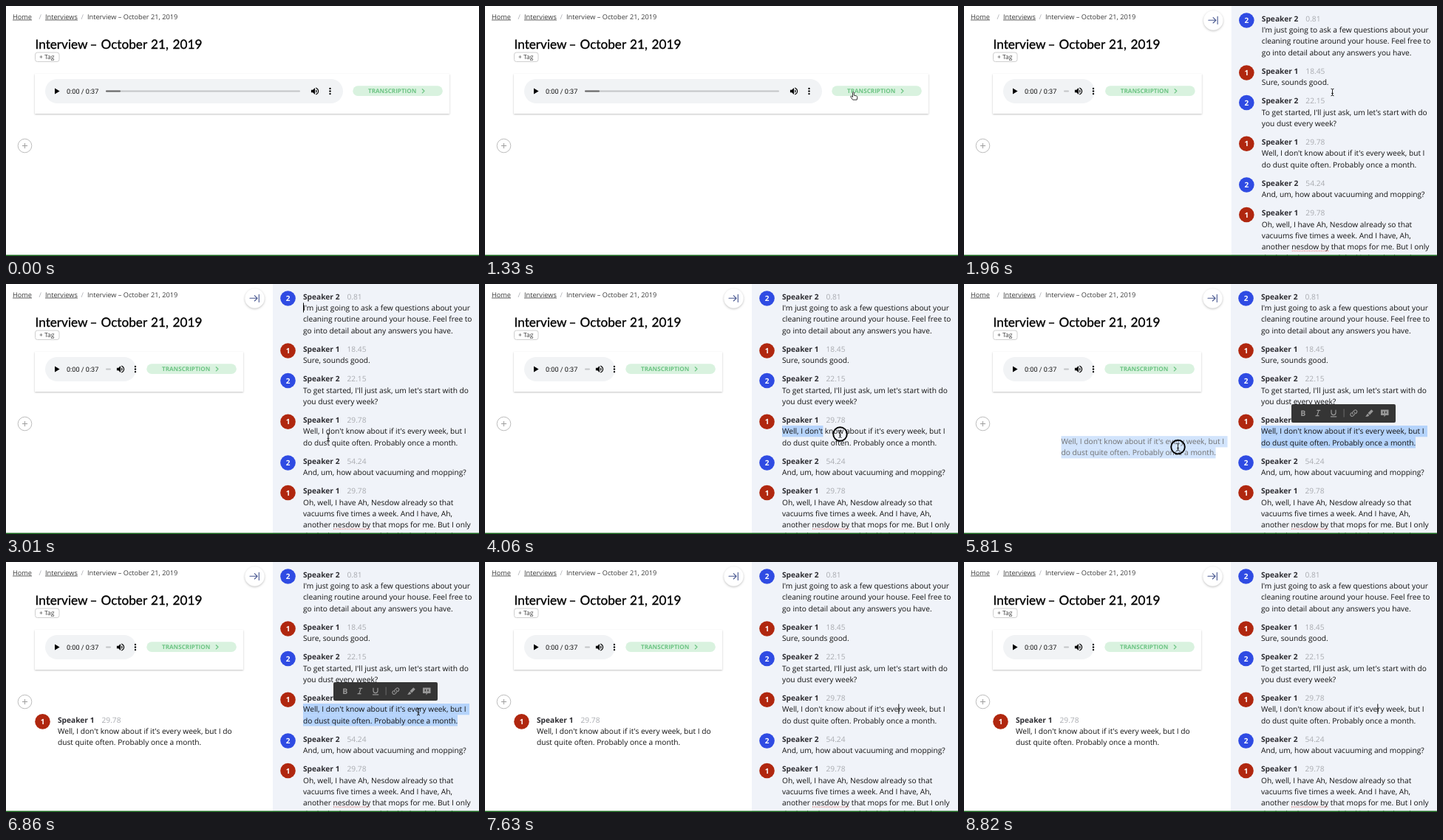
Write an HTML page that moves like this. It is 640 px wide and 339 px high and loops after 8890 ms.

```html
<!DOCTYPE html>
<html lang="en">
<head>
<meta charset="utf-8">
<title>Interview transcript</title>
<style>
  html, body { margin: 0; width: 100%; height: 100%; overflow: hidden; background: #fff; }
  svg { display: block; width: 100vw; height: 100vh; }
  text { font-family: "Open Sans", sans-serif; fill: #111; text-rendering: geometricPrecision; white-space: pre; }
  .title { font-family: Lato, sans-serif; fill: #000; stroke: #000; stroke-width: .35px; }
  .clock { font-family: Roboto, sans-serif; }
  .bold { font-weight: 700; }
  .name { font-weight: 700; fill: #2e2e33; }
  .grey { fill: #a9abb0; }
  .crumb { fill: #3c3c3c; }
  .line { fill: none; stroke-linecap: round; stroke-linejoin: round; }
  #card { fill: #fff; filter: drop-shadow(0 1px 1.2px rgba(0,0,0,.24)); }
  #fold circle { fill: #fff; filter: drop-shadow(0 1px 1.5px rgba(0,0,0,.25)); }
</style>
</head>
<body>
<svg id="stage" viewBox="0 0 640 339"></svg>
<script>
const LOOP = 8890, STEP = 70;
const BLUE = "#2f4be3", RED = "#b0270f";
const SIZE = 10.2, LEAD = 15.25, GAP = 40.5;

const text = (x, y, size, str, more = "") =>
  `<text x="${x}" y="${y}" font-size="${size}" ${more}>${str}</text>`;
const rect = (x, y, w, h, fill, more = "") =>
  `<rect x="${x}" y="${y}" width="${w}" height="${h}" fill="${fill}" ${more}/>`;
const stroke = (d, color, width = 1, more = "") =>
  `<path class="line" d="${d}" stroke="${color}" stroke-width="${width}" ${more}/>`;

const lines = (x, y, rows) =>
  rows.map((row, i) => text(x, y + i * LEAD, SIZE, row)).join("");

// One speaker turn; y is the baseline of the name.
const turn = (x, y, who, time, rows) =>
  `<circle cx="${x - 20.5}" cy="${y - 1.2}" r="10.3" fill="${who === 1 ? RED : BLUE}"/>` +
  text(x - 20.5, y + 2.4, 10, who, 'class="bold" style="fill:#fff" text-anchor="middle"') +
  text(x, y, SIZE, "Speaker " + who, 'class="name"') +
  text(x + 59.5, y, SIZE, time, 'class="grey"') +
  lines(x, y + 15.5, rows);

const quote = ["Well, I don't know about if it's every week, but I",
               "do dust quite often. Probably once a month."];
const copied = ["Well, I don't know about if it's every week, but I do",
                "dust quite often. Probably once a month."];
const talk = [
  [2, "0.81", ["I'm just going to ask a few questions about your",
               "cleaning routine around your house. Feel free to",
               "go into detail about any answers you have."]],
  [1, "18.45", ["Sure, sounds good."]],
  [2, "22.15", ["To get started, I'll just ask, um let's start with do",
                "you dust every week?"]],
  [1, "29.78", quote],
  [2, "54.24", ["And, um, how about vacuuming and mopping?"]],
  [1, "29.78", ["Oh, well, I have Ah, Nesdow already so that",
                "vacuums five times a week. And I have, Ah,",
                "another nesdow by that mops for me. But I only",
                "do the bathrooms and the kitchen by hand."]]
];

function transcript() {
  let y = 20.7, out = "";
  for (const [who, time, rows] of talk) {
    out += turn(402, y, who, time, rows);
    y += GAP + (rows.length - 1) * LEAD;
  }
  return out;
}

const titleWords = [[39.5, "Interview"], [113.5, "–"], [128.5, "October"], [196, "21,"], [225.5, "2019"]];

const page =
  text(9, 17.6, 9.2, "Home", 'class="crumb"') + rect(9, 18.6, 26, .8, "#3c3c3c") +
  text(44.4, 17.6, 9.2, "/", 'class="grey"') +
  text(53, 17.6, 9.2, "Interviews", 'class="crumb"') + rect(53, 18.6, 44, .8, "#3c3c3c") +
  text(101.6, 17.6, 9.2, "/", 'class="grey"') +
  text(110, 17.6, 9.2, "Interview – October 21, 2019", 'class="crumb"') +
  titleWords.map(([x, w]) => text(x, 58, 17.2, w, 'class="title"')).join("") +
  rect(39.5, 63, 32.5, 12.5, "#fff", 'rx="3" stroke="#cfcfcf"') +
  text(45, 72.2, 8.5, "+ Tag", 'class="crumb"') +
  '<circle cx="25.5" cy="189.5" r="9.3" fill="#fff" stroke="#bdbdbd"/>' +
  stroke("M22.3 189.5h6.4M25.5 186.3v6.4", "#a0a0a0");

const speaker = "M3 9v6h4l5 5V4L7 9H3zm13.5 3c0-1.77-1.02-3.29-2.5-4.03v8.05c1.48-.73 2.5-2.25 2.5-4.02z" +
  "M14 3.23v2.06c2.89.86 5 3.54 5 6.71s-2.11 5.85-5 6.71v2.06c4.01-.91 7-4.49 7-8.77s-2.99-7.86-7-8.77z";

const player =
  rect(39, 92, 561, 54, "#fff", 'id="card"') +
  rect(53, 99, 402, 33, "#f1f3f5", 'id="pill" rx="16.5"') +
  '<path d="M66 111.4l6.6 4.1-6.6 4.1z"/>' +
  text(82, 118.8, 9.1, "0:00 / 0:37", 'class="clock"') +
  rect(135, 114.5, 263, 2, "#c3c5c7", 'id="bar" rx="1"') +
  rect(135, 114.5, 20, 2, "#666", 'id="buffer" rx="1"') +
  `<g id="volume"><path transform="translate(-6.8 108.7) scale(.57)" d="${speaker}"/></g>` +
  '<g id="more">' + [111.9, 115.5, 119.1].map(y => `<circle cy="${y}" r="1.2"/>`).join("") + "</g>" +
  '<g id="button">' + rect(0, 108.3, 121.5, 13.8, "#d9f2df", 'rx="6.9"') +
  text(20.7, 118.3, 8.1, "TRANSCRIPTION", 'class="bold" style="fill:#6cc483"') +
  stroke("M94 112.7l2.7 2.6-2.7 2.6", "#6cc483", 1.2) + "</g>";

const fold = '<g id="fold"><circle cx="336.5" cy="19.5" r="13.2"/>' +
  stroke("M330 19.3h10M336.3 15.6l3.8 3.7-3.8 3.7M342.3 14.2v10.2", "#46568f", 1.1) + "</g>";

const panel = '<g id="panel">' + rect(361, 0, 279, 339, "#f0f3f9") +
  '<g id="select">' + rect(402, 192, 0, 15.3, "#b5d3fb", 'id="sel1"') +
  rect(402, 207.2, 0, 15.3, "#b5d3fb", 'id="sel2"') + "</g>" + transcript() +
  stroke("M443.5 332H493", "#e0423a", 1.1, 'stroke-dasharray=".1 2.2"') +
  rect(402, 25.5, 1, 13, "#111", 'id="caret1"') +
  rect(559.3, 192.5, 1, 13.5, "#111", 'id="caret2"') + "</g>";

const ICON = "#979797";
const toolbar = '<g id="toolbar">' + rect(443, 163, 141, 25, "#353535", 'rx="2"') +
  text(455.3, 178.7, 10.5, "B", `class="bold" style="fill:${ICON}"`) +
  stroke("M477.8 171.3h4M476 178.7h4M480 171.3l-2.2 7.4", ICON, 1.2) +
  stroke("M497 171v3.6a3 3 0 0 0 6 0V171M496.4 179.8h7.4", ICON, 1.2) +
  rect(513.6, 169.5, 1, 11, "#6d6d6d") +
  stroke("M526.2 176.4a2.2 2.2 0 0 1 0-3l2-2a2.2 2.2 0 0 1 3.1 3.1l-1 1" +
         "M528.4 173.8a2.2 2.2 0 0 1 0 3l-2 2a2.2 2.2 0 0 1-3.1-3.1l1-1", ICON, 1.1) +
  `<path fill="${ICON}" d="M551.2 170.2l2.5 2.4-4.6 5-2.6-2.6zM546 175.7l2.4 2.3-1.6 1.4-3.6.6 1.6-2.4z"/>` +
  `<path fill="${ICON}" d="M564 170.5h10.5v7.5h-4l-2 2.4v-2.4H564z"/>` +
  stroke("M567.4 173.2v1.6M571 173.2v1.6", "#353535", 1.4) + "</g>";

const ghost = '<g id="ghost" opacity=".6">' + rect(402, 192, 225, 15.3, "#b5d3fb") +
  rect(402, 207, 209, 15.3, "#b5d3fb") + lines(402, 203, quote) + "</g>";

const pointer = '<g id="pointer"><circle id="ring" r="9.3" fill="none" stroke="#000" stroke-width="1.9"/>' +
  '<path id="arrow" d="M0 0v10.5l2.5-2.3 1.7 3.9 1.7-.7-1.7-3.8h3.4z" stroke="#fff" stroke-width=".8"/>' +
  '<path id="hand" d="M-1 .6c0-1.4 1.8-1.4 1.8 0v3.6l3.2.7q1.5.4 1.3 2l-.6 3.3H-.9L-3.6 6.4c-.6-1.2.8-1.7 1.5-.9l1.1 1.1z" fill="#fff" stroke="#222" stroke-width=".9"/>' +
  stroke("M-1.6-4.8Q0-4.8 0-3.6V3.6M1.6-4.8Q0-4.8 0-3.6M-1.6 4.8Q0 4.8 0 3.6M1.6 4.8Q0 4.8 0 3.6M-1 1.4h2",
         "#111", .9, 'id="beam"') + "</g>";

document.getElementById("stage").innerHTML = rect(0, 0, 640, 339, "#fff") + page + player +
  '<g id="note">' + turn(70, 217.6, 1, "29.78", copied) + "</g>" +
  fold + panel + toolbar + ghost + rect(0, 337.5, 640, 1.5, "#17651b") + pointer;

const el = {};
document.querySelectorAll("[id]").forEach(e => el[e.id] = e);

// Pointer stops: time, x, y, and 1 where the way there is at even speed.
const stops = [
  [70, 410, 311], [420, 364, 174], [490, 364, 174], [560, 366, 172, 1], [630, 366, 172],
  [700, 364, 171, 1], [770, 364, 171], [1330, 498.5, 117], [2100, 498.5, 117],
  [2800, 436, 208], [3150, 436, 208], [3570, 402, 200], [3640, 402, 200],
  [4060, 480.5, 203.5, 1], [4690, 607.5, 214.5, 1], [4830, 607.5, 214.5],
  [5180, 560, 207], [5320, 560, 207], [6020, 215, 225], [6160, 215, 225],
  [6790, 558, 203], [LOOP, 558, 203]
];
const clamp = v => Math.min(1, Math.max(0, v));
const smooth = v => v * v * (3 - 2 * v);
const within = (t, a, b) => t >= a && t < b;

function spot(t) {
  const i = Math.max(1, stops.findIndex(s => s[0] >= t));
  const [t0, x0, y0] = stops[i - 1], [t1, x1, y1, even] = stops[i];
  let k = clamp((t - t0) / (t1 - t0));
  if (!even) k = smooth(k);
  return [x0 + (x1 - x0) * k, y0 + (y1 - y0) * k];
}

const show = (id, on) => el[id].style.display = on ? "" : "none";
const width = (id, w) => el[id].setAttribute("width", Math.max(0, w));
const move = (id, x, y = 0) => el[id].setAttribute("transform", `translate(${x} ${y})`);

function layout(open) {
  const w = 640 - 279 * open, end = w - 185;
  width("card", w - 79);
  width("pill", end - 52 + (open ? -open : 0));
  const bar = Math.max(7, end - 192);
  width("bar", bar);
  width("buffer", bar > 20 ? bar * .076 : 0);
  move("volume", Math.max(155, end - 37));
  move("more", Math.max(175, end - 16.5));
  move("button", w - 170.7);
  move("panel", 279 * (1 - open));
  move("fold", 279 * (1 - open));
  el.fold.setAttribute("opacity", open);
}

function draw(t) {
  const [x, y] = spot(t);
  layout(1 - (1 - clamp((t - 1540) / 490)) ** 3);

  const picked = t >= 4690;
  const second = picked || y >= 209;
  show("select", within(t, 3640, 7350));
  width("sel1", second ? 225 : x - 23 - 402);
  width("sel2", picked ? 209 : second ? x - 402 : 0);
  show("toolbar", within(t, 4690, 7350));

  show("caret1", within(t, 1980, 3640) && (t - 1980) % 1000 < 500);
  show("caret2", t >= 7400 && (t - 7400) % 1000 < 500);

  show("ghost", within(t, 5390, 6090));
  move("ghost", x - 560, y - 207);
  show("note", t >= 6090);

  const hand = within(t, 770, 1890) && x > 469 && y < 122.5;
  const beam = t >= 1890;
  show("pointer", within(t, 70, 7490));
  move("pointer", x, y);
  show("hand", hand);
  show("beam", beam);
  show("arrow", !hand && !beam);
  show("ring", within(t, 1540, 1680) || within(t, 3640, 4830) ||
               within(t, 5320, 6090) || within(t, 7280, 7420));
}

const start = performance.now();
function tick() {
  const t = (performance.now() - start) % LOOP;
  draw(Math.floor(t / STEP) * STEP);
  requestAnimationFrame(tick);
}
tick();
</script>
</body>
</html>
```
